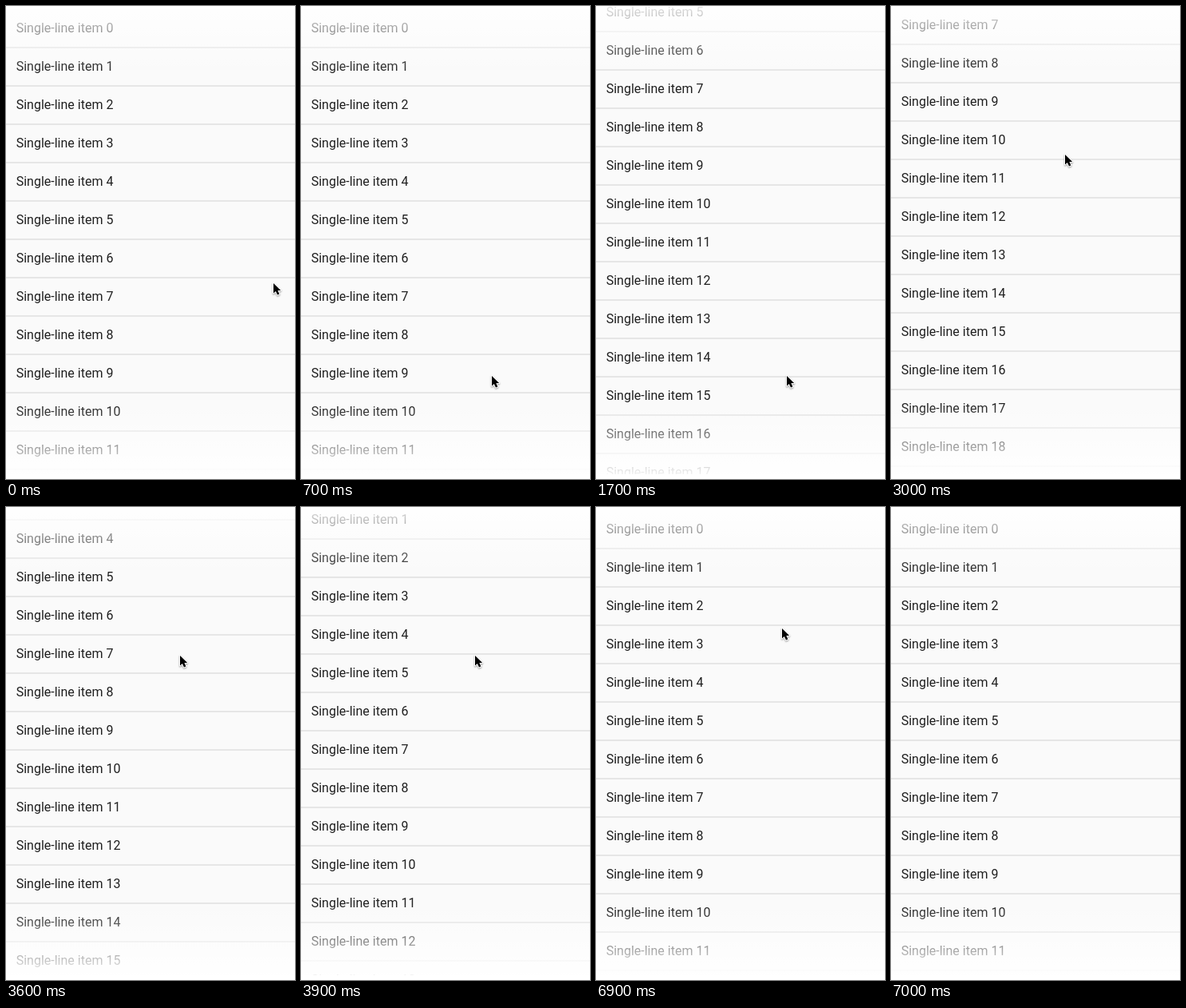
An HTML page with a canvas for the animation above (7.7 s loop, 362 by 592 pixels).

```html
<!DOCTYPE html>
<html lang="en">
<head>
<meta charset="utf-8">
<title>Fading list</title>
<style>
  html, body { margin: 0; width: 100%; height: 100%; overflow: hidden; background: #fff; }
  canvas { display: block; }
</style>
</head>
<body>
<canvas id="stage" width="362" height="592"></canvas>
<script>
const ctx = document.getElementById('stage').getContext('2d');
const WIDTH = 362, HEIGHT = 592, VIEW_BOTTOM = 586;
const LOOP = 7700, TICK = 100;
const ROW = 48, LIST_TOP = 4, NOTCH = 20, MAX_SCROLL = 340;

const arrow = new Path2D('M0 0V12.6L2.9 9.9L5 14.6L7.4 13.6L5.4 9H9.2Z');
const start = [335, 347], rest = [239, 463], end = [218, 186], exit = [233, 152];
const sweep = [[340, 353], [325, 384], [272, 436], [192, 478], [143, 488], [199, 476], rest];
const rise = [[238, 441], [234, 382], [229, 309], [224, 247], [220, 203], end];

// Position along a list of per-tick stops, holding the last one.
const along = (stops, step) => stops[Math.min(step, stops.length - 1)];

function pointerAt(tick) {
  if (tick < 1) return start;
  if (tick < 25) return along(sweep, tick - 1);
  if (tick < 69) return along(rise, tick - 25);
  return tick < 70 ? exit : null;
}

// The wheel turns 1.7 notches per tick down and 2 notches per tick up.
function scrollAt(tick) {
  if (tick < 10) return 0;
  if (tick < 33) return Math.min(MAX_SCROLL, NOTCH * Math.floor((tick - 9) * 17 / 10));
  return Math.max(0, MAX_SCROLL - 2 * NOTCH * (tick - 32));
}

function fade(from, to) {
  const gradient = ctx.createLinearGradient(0, from, 0, to);
  gradient.addColorStop(0, 'rgba(255,255,255,0)');
  gradient.addColorStop(1, '#fff');
  ctx.fillStyle = gradient;
  ctx.fillRect(0, Math.min(from, to), WIDTH, Math.abs(to - from));
}

function drawList(scroll) {
  const top = LIST_TOP - scroll;
  ctx.fillStyle = '#fafafa';
  ctx.fillRect(0, Math.max(0, top), WIDTH, HEIGHT);
  ctx.font = '16px Roboto, sans-serif';
  for (let i = Math.floor(scroll / ROW); top + i * ROW < HEIGHT; i++) {
    const y = top + i * ROW;
    ctx.fillStyle = '#e6e6e6';
    ctx.fillRect(0, y + ROW - 1, WIDTH, 2);
    ctx.fillStyle = '#202020';
    ctx.fillText('Single-line item ' + i, 12.7, y + 29);
  }
  fade(84, -11);
  fade(497, 592);
  ctx.fillStyle = '#fff';
  ctx.fillRect(0, VIEW_BOTTOM, WIDTH, HEIGHT - VIEW_BOTTOM);
}

function drawPointer([x, y]) {
  ctx.save();
  ctx.translate(x, y);
  ctx.lineWidth = 2;
  ctx.lineJoin = 'round';
  ctx.strokeStyle = '#fff';
  ctx.shadowColor = 'rgba(0,0,0,.4)';
  ctx.shadowBlur = 2;
  ctx.shadowOffsetY = 1;
  ctx.stroke(arrow);
  ctx.shadowColor = 'transparent';
  ctx.fillStyle = '#000';
  ctx.fill(arrow);
  ctx.restore();
}

function draw() {
  const tick = Math.floor(performance.now() % LOOP / TICK);
  const pointer = pointerAt(tick);
  ctx.clearRect(0, 0, WIDTH, HEIGHT);
  drawList(scrollAt(tick));
  if (pointer) drawPointer(pointer);
  requestAnimationFrame(draw);
}
draw();
</script>
</body>
</html>
```
